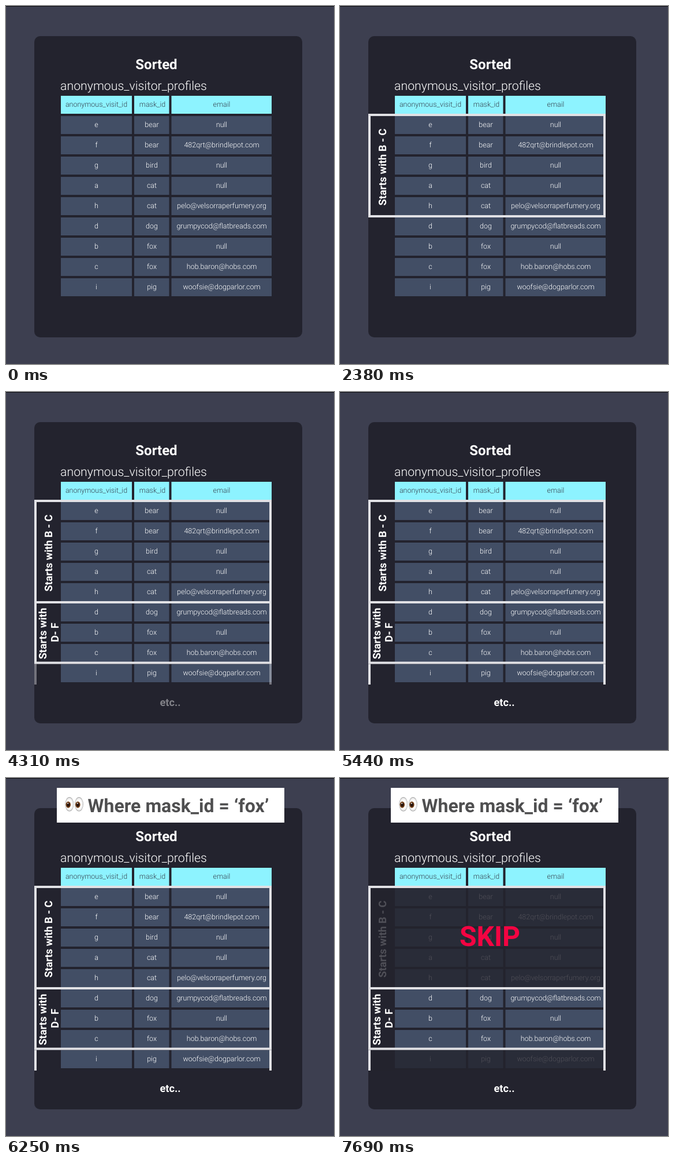
An HTML page that plays this animation: 568x618 px, repeating every 8000 ms.

```html
<!DOCTYPE html>
<html lang="en">
<head>
<meta charset="utf-8">
<title>Sorted table scan</title>
<style>
  html, body { margin: 0; width: 100%; height: 100%; overflow: hidden; background: #3d3f50; }
  svg { display: block; width: 568px; height: 618px; }
  text { font-family: Roboto, "Liberation Sans", sans-serif; fill: #fff; text-rendering: geometricPrecision; }
  .light { font-weight: 300; font-size: 12.5px; text-anchor: middle; }
  .head { fill: #35404c; }
  .bold { font-weight: 700; font-size: 18.2px; text-anchor: middle; }
  .frame { fill: none; stroke: #e1e1e5; stroke-width: 4; }
  .shade { fill: #23232e; fill-opacity: .8; }
</style>
</head>
<body>
<svg viewBox="0 0 568 618">
  <defs>
    <radialGradient id="white">
      <stop offset=".6" stop-color="#fff"/>
      <stop offset=".88" stop-color="#e4e4e4"/>
      <stop offset="1" stop-color="#8e8e8e"/>
    </radialGradient>
    <radialGradient id="iris">
      <stop offset=".45" stop-color="#24120c"/>
      <stop offset=".65" stop-color="#5e3216"/>
      <stop offset="1" stop-color="#8a5524"/>
    </radialGradient>
    <g id="eye">
      <ellipse rx="7.4" ry="12.2" fill="url(#white)"/>
      <ellipse cx="-2" cy=".8" rx="4.3" ry="5.6" fill="url(#iris)"/>
      <circle cx="-2.6" cy="-1.6" r="1" fill="#fff"/>
    </g>
  </defs>

  <rect width="568" height="618" fill="#3d3f50"/>
  <rect width="568" height="1" fill="#0c0c10"/>
  <rect x="49" y="52" width="464" height="520" rx="10" fill="#23232e"/>
  <text class="bold" x="260.5" y="109" style="font-size:24px">Sorted</text>
  <text x="94" y="145" style="font-weight:300;font-size:21.3px">anonymous_visitor_profiles</text>
  <g id="table"></g>

  <g class="second">
    <text class="bold" transform="translate(70 417) rotate(-90)">Starts with</text>
    <text class="bold" transform="translate(91 415) rotate(-90)">D- F</text>
  </g>
  <text class="bold first" transform="translate(80 278) rotate(-90)">Starts with B - C</text>

  <g id="dim">
    <rect class="shade" x="51" y="188" width="407" height="175"/>
    <rect class="shade" x="51" y="468" width="407" height="37"/>
  </g>

  <g class="third">
    <path class="frame" d="M51 469.5V505M458 469.5V505"/>
    <text class="bold" x="284.5" y="542">etc..</text>
  </g>
  <rect class="frame second" x="51" y="363" width="407" height="104.5"/>
  <rect class="frame first" x="51" y="188" width="407" height="175"/>

  <g id="banner">
    <rect x="88" y="17" width="394" height="60" fill="#fff"/>
    <use href="#eye" x="109.8" y="45.3"/>
    <use href="#eye" x="126.4" y="45.3"/>
    <text class="bold" x="141.5" y="59" style="font-size:32px;text-anchor:start;fill:#4f4f50">Where mask_id = ‘fox’</text>
  </g>
  <text class="bold" id="skip" x="259.5" y="290" style="font-size:48px;fill:#f40442">SKIP</text>
</svg>
<script>
  const LOOP = 8000;
  const columns = [
    { x: 95, w: 123, mid: 156.5 },
    { x: 222, w: 60.5, mid: 252.5 },
    { x: 286.5, w: 173.5, mid: 373.5 }
  ];
  const rows = [
    ["anonymous_visit_id", "mask_id", "email"],
    ["e", "bear", "null"],
    ["f", "bear", "482qrt@brindlepot.com"],
    ["g", "bird", "null"],
    ["a", "cat", "null"],
    ["h", "cat", "pelo@velsorraperfumery.org"],
    ["d", "dog", "grumpycod@flatbreads.com"],
    ["b", "fox", "null"],
    ["c", "fox", "hob.baron@hobs.com"],
    ["i", "pig", "woofsie@dogparlor.com"]
  ];

  function add(parent, tag, attrs, content = "") {
    const el = document.createElementNS("http://www.w3.org/2000/svg", tag);
    for (const key in attrs) el.setAttribute(key, attrs[key]);
    el.textContent = content;
    parent.appendChild(el);
  }

  const table = document.getElementById("table");
  rows.forEach((cells, r) => cells.forEach((label, c) => {
    const { x, w, mid } = columns[c];
    const y = 155 + 35 * r;
    add(table, "rect", { x, y, width: w, height: 31, fill: r ? "#424e65" : "#8df3ff" });
    add(table, "text", { class: r ? "light" : "light head", x: r || c !== 1 ? mid : 253.5, y: y + 19 }, label);
  }));

  // The first frame cuts in part-way through its fade.
  const fades = [
    { target: ".first", start: 1740, cut: 1880 },
    { target: ".second", start: 3094 },
    { target: ".third", start: 4176 },
    { target: "#banner", start: 5505 },
    { target: "#dim", start: 7080 },
    { target: "#skip", start: 7300 }
  ].map(f => ({ ...f, parts: document.querySelectorAll(f.target) }));
  const FADE = 320;

  function draw(t) {
    for (const { start, cut = start, parts } of fades) {
      const alpha = t < cut ? 0 : Math.min(1, (t - start) / FADE);
      parts.forEach(el => el.setAttribute("opacity", alpha));
    }
  }

  function tick() {
    draw(performance.now() % LOOP);
    requestAnimationFrame(tick);
  }
  tick();
</script>
</body>
</html>
```
